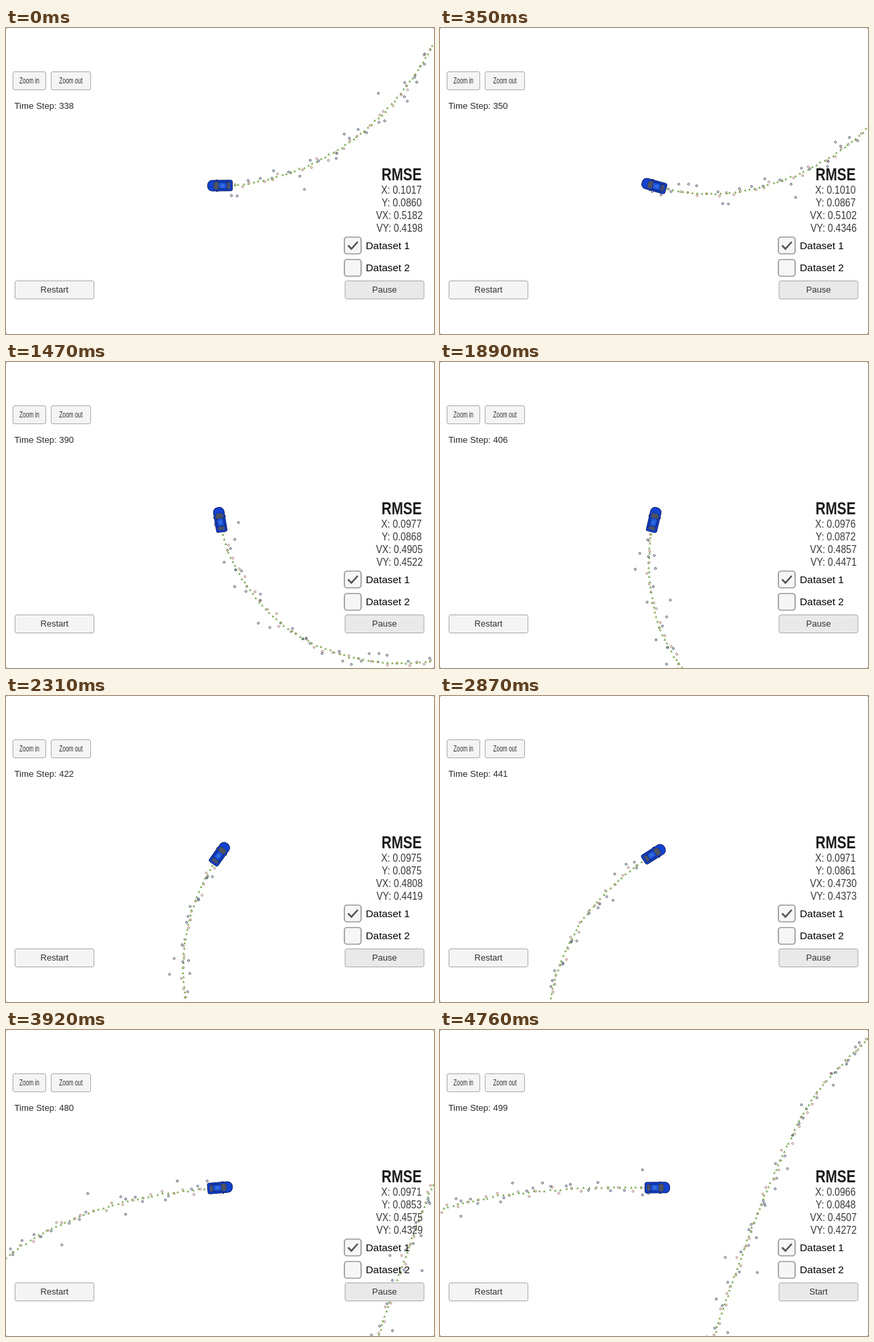
Recreate the animation shown at these times as an HTML page with a canvas. Size 640 px wide and 458 px high, loop 5.53 s.

```html
<!DOCTYPE html>
<html lang="en">
<head>
<meta charset="utf-8">
<title>Vehicle tracking</title>
<style>
html, body { margin: 0; width: 100%; height: 100%; overflow: hidden; background: #fff; }
canvas { display: block; width: 100vw; height: 100vh; }
</style>
</head>
<body>
<canvas id="stage" width="640" height="458"></canvas>
<script>
const ctx = document.getElementById('stage').getContext('2d');
const TICK = 70, LOOP = 5530, LAST_TICK = 68, STOP_TICK = 64;
const FIRST = 180, LAST = 499, STRIDE = 20;
const SANS = '"Liberation Sans", Arial, sans-serif';

// Where the car is at every STRIDE-th time step, counted from FIRST.
const course = [
  [653, -856], [554, -751], [489, -623], [437, -488], [389, -353], [326, -222],
  [242, -106], [126, -27], [-14, 0], [-152, -40], [-250, -145], [-275, -288],
  [-229, -425], [-123, -529], [14, -588], [167, -612], [324, -615]
];

// Readouts at key ticks; everything between is interpolated.
const keys = [
  { tick: 0, step: 338, errors: [.1017, .0860, .5182, .4198] },
  { tick: 11, step: 365, errors: [.1002, .0876, .5006, .4524] },
  { tick: 21, step: 390, errors: [.0977, .0868, .4905, .4522] },
  { tick: 33, step: 422, errors: [.0975, .0875, .4808, .4419] },
  { tick: 48, step: 458, errors: [.0968, .0849, .4662, .4332] },
  { tick: 56, step: 480, errors: [.0971, .0853, .4575, .4329] },
  { tick: STOP_TICK, step: LAST, errors: [.0966, .0848, .4507, .4272] }
];

const clamp = (v, low, high) => Math.max(low, Math.min(high, v));
const mix = (a, b, t) => a + (b - a) * t;

function randomSource(seed) {
  return () => {
    seed = (Math.imul(seed, 1664525) + 1013904223) >>> 0;
    return seed / 2 ** 32;
  };
}

function place(step) {
  const u = (clamp(step, FIRST, LAST + 1) - FIRST) / STRIDE;
  const i = Math.min(Math.floor(u), course.length - 2), t = u - i;
  const [a, b, c, d] = [-1, 0, 1, 2].map(k => course[clamp(i + k, 0, course.length - 1)]);
  return [0, 1].map(k => .5 * (2 * b[k] + (c[k] - a[k]) * t
    + (2 * a[k] - 5 * b[k] + 4 * c[k] - d[k]) * t * t
    + (3 * b[k] - a[k] - 3 * c[k] + d[k]) * t * t * t));
}

// Each step leaves an estimate and, in turn, a lidar or a wider radar reading.
function buildMarks() {
  const random = randomSource(7);
  const marks = [];
  for (let step = FIRST; step <= LAST; step++) {
    const [x, y] = place(step);
    const add = (kind, reach) => {
      const angle = random() * 2 * Math.PI;
      marks.push({ kind, step, x: x + Math.cos(angle) * reach, y: y + Math.sin(angle) * reach });
    };
    if (step % 2) add('lidar', 7 * random());
    else add('radar', 4 + 30 * random() ** 2.5);
    add('estimate', 1.5 * random());
  }
  return marks;
}

const marks = buildMarks();

function readoutAt(tick) {
  const next = keys.findIndex(key => key.tick > tick);
  if (next < 0) return keys[keys.length - 1];
  const a = keys[next - 1], b = keys[next];
  const t = (tick - a.tick) / (b.tick - a.tick);
  return {
    step: Math.round(mix(a.step, b.step, t)),
    errors: a.errors.map((v, k) => mix(v, b.errors[k], t))
  };
}

function drawMark({ kind, x, y }) {
  ctx.beginPath();
  if (kind === 'estimate') {
    ctx.moveTo(x, y - 1.9);
    ctx.lineTo(x + 1.9, y + 1.6);
    ctx.lineTo(x - 1.9, y + 1.6);
    ctx.fillStyle = '#7cab52';
    ctx.fill();
    return;
  }
  ctx.lineWidth = .8;
  ctx.strokeStyle = kind === 'radar' ? '#1b2746' : '#94604f';
  ctx.arc(x, y, 1.5, 0, 2 * Math.PI);
  ctx.stroke();
}

function box(x, y, w, h, r, fill, stroke, lineWidth = 1) {
  ctx.beginPath();
  ctx.roundRect(x, y, w, h, r);
  ctx.fillStyle = fill;
  ctx.fill();
  if (!stroke) return;
  ctx.lineWidth = lineWidth;
  ctx.strokeStyle = stroke;
  ctx.stroke();
}

function drawCar([x, y], angle) {
  ctx.save();
  ctx.translate(x, y);
  ctx.rotate(angle);
  box(3, -9.3, 2.5, 18.6, 1, '#101528');
  box(-18.5, -8, 37, 16, [3, 7, 7, 3], '#1242d0', '#0b1d66');
  box(-16, -6, 26, 12, 3, '#0e2a8e');
  box(2, -5.5, 7.5, 11, [1, 3, 3, 1], '#4c5260');
  box(-15.5, -4.8, 5, 9.6, 1, '#4a526a');
  box(-9.5, -4.5, 11, 9, 2, '#1d57dd');
  box(-6.5, -2, 5, 4, 1, '#3b6fd8');
  ctx.restore();
}

function text(label, x, y, size, { align = 'left', color = '#2a2a2a', weight = '', squash = 1 } = {}) {
  ctx.save();
  ctx.translate(x, y);
  ctx.scale(squash, 1);
  ctx.font = `${weight} ${size}px ${SANS}`;
  ctx.textAlign = align;
  ctx.fillStyle = color;
  ctx.fillText(label, 0, 0);
  ctx.restore();
}

function button(label, x, y, w, fill, { size = 13, squash = 1 } = {}) {
  box(x + .5, y + .5, w - 1, 27, 2.5, fill, '#a8a8a8');
  text(label, x + w / 2, y + 18.4, size, { align: 'center', color: '#323232', squash });
}

function checkbox(label, y, checked) {
  box(506, y, 25, 25, 4, '#f6f6f6', '#999', 1.7);
  if (checked) {
    ctx.beginPath();
    ctx.moveTo(511.5, y + 12.5);
    ctx.lineTo(516.5, y + 17.5);
    ctx.lineTo(526, y + 7);
    ctx.lineWidth = 2.6;
    ctx.strokeStyle = '#555';
    ctx.stroke();
  }
  text(label, 538, y + 17.6, 15.4, { color: '#000' });
}

function drawPanel(step, errors, running) {
  const narrow = { size: 12, squash: .69 };
  button('Zoom in', 10, 65, 50, '#f4f4f4', narrow);
  button('Zoom out', 67, 65, 60, '#f4f4f4', narrow);
  text('Time Step: ' + step, 12.5, 121, 13.2);

  text('RMSE', 621.5, 228, 26, { align: 'right', weight: 'bold', color: '#1c1c1c', squash: .8 });
  ['X', 'Y', 'VX', 'VY'].forEach((name, i) =>
    text(`${name}: ${errors[i].toFixed(4)}`, name.length > 1 ? 623 : 621.5, 248 + 19 * i, 17,
      { align: 'right', color: '#383838', squash: .83 }));

  checkbox('Dataset 1', 313, true);
  checkbox('Dataset 2', 346.5, false);
  button('Restart', 13, 378, 119, '#f4f4f4');
  button(running ? 'Pause' : 'Start', 506.5, 378, 119, '#e9e9e9');
}

function draw(time) {
  const tick = Math.min(LAST_TICK, Math.floor(time % LOOP / TICK));
  const { step, errors } = readoutAt(tick);
  const camera = place(Math.min(step, LAST - 1));
  const before = place(step - 1), after = place(step + 1);

  ctx.fillStyle = '#fff';
  ctx.fillRect(0, 0, 640, 458);
  ctx.save();
  ctx.translate(320 - camera[0], 236 - camera[1]);
  marks.filter(mark => mark.step <= step).forEach(drawMark);
  drawCar(place(step), Math.atan2(after[1] - before[1], after[0] - before[0]));
  ctx.restore();

  drawPanel(step, errors, tick <= STOP_TICK);
  ctx.fillStyle = '#777';
  for (const x of [0, 639]) for (const y of [0, 457]) ctx.fillRect(x, y, 1, 1);
}

const start = performance.now();
function loop() {
  draw(performance.now() - start);
  requestAnimationFrame(loop);
}
loop();
</script>
</body>
</html>
```
